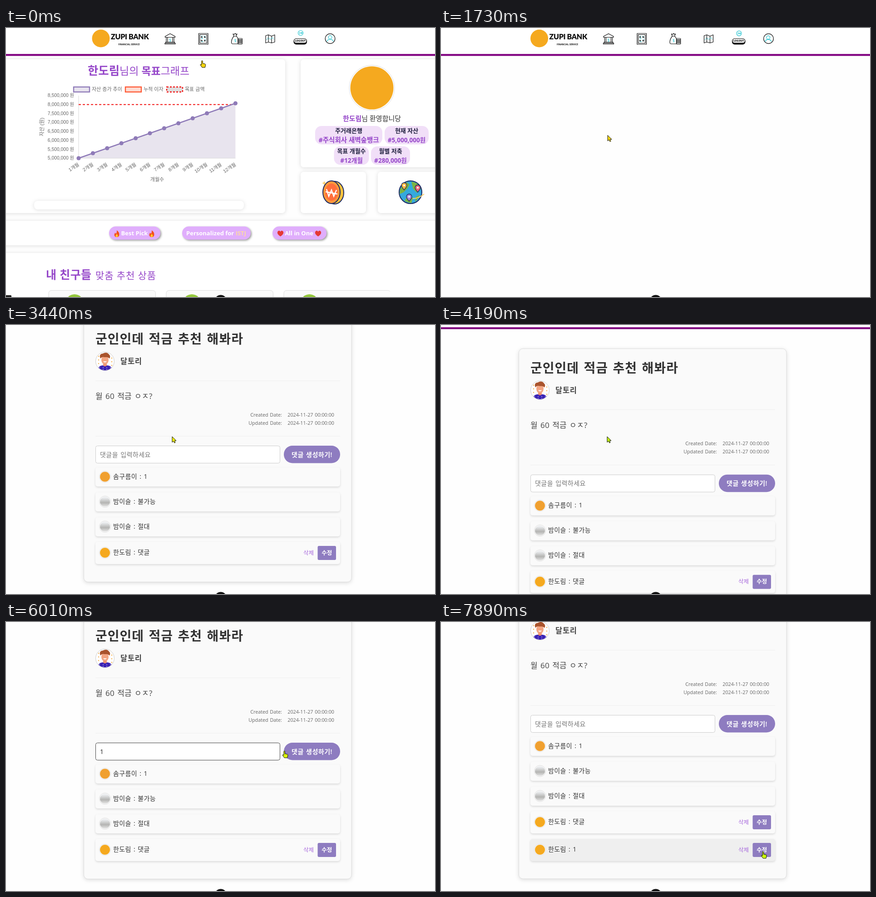
An HTML page for the animation above (8000 ms loop, 945 by 593 pixels).

```html
<!DOCTYPE html>
<html lang="ko">
<head>
<meta charset="utf-8">
<title>Bank community</title>
<style>
  html, body { margin: 0; width: 100%; height: 100%; overflow: hidden; background: #fefefe; }
  svg { display: block; width: 945px; height: 593px; }
  text { font-family: 'Open Sans', 'Noto Sans CJK KR', sans-serif; white-space: pre; }
  #post text { word-spacing: .08em; }
  .chart text { font-family: 'Liberation Sans', 'Noto Sans CJK KR', sans-serif; fill: #666; }
  .panel { fill: #fff; filter: drop-shadow(0 1px 4px #0002); }
  .pill { fill: #e0aefc; filter: drop-shadow(2px 2px 2px #0006); }
  .row { fill: #fafafa; filter: drop-shadow(0 2px 2px #0002); }
  .row.hover { fill: #efefef; }
  .icon { fill: none; stroke: #111; stroke-width: 1.2; stroke-linejoin: round; }
  .teal { stroke: #22c3cf; }
  b, .b { font-weight: 700; }
</style>
</head>
<body>
<svg id="stage" viewBox="0 0 945 593"></svg>
<script>
const PURPLE = '#9546c9', LILAC = '#8e7cc0', LINE = '#8f7bb8', ORANGE = '#f5a91f';
const LOOP = 8000, LIST_AT = 1350, POST_AT = 1950, FOCUS_AT = 5330, TYPE_AT = 5540, SEND_AT = 6450;

const rect = (x, y, w, h, r = 0, attrs = '') =>
  `<rect x="${x}" y="${y}" width="${w}" height="${h}" rx="${r}" ${attrs}/>`;
const circle = (x, y, r, attrs = '') => `<circle cx="${x}" cy="${y}" r="${r}" ${attrs}/>`;
const path = (d, attrs = '') => `<path d="${d}" ${attrs}/>`;
const text = (x, y, size, str, fill = '#333', attrs = '') =>
  `<text x="${x}" y="${y}" font-size="${size}" fill="${fill}" ${attrs}>${str}</text>`;
const group = (attrs, ...parts) => `<g ${attrs}>${parts.join('')}</g>`;
const range = (n, fn) => Array.from({ length: n }, (_, i) => fn(i)).join('');
const MID = 'text-anchor="middle"', END = 'text-anchor="end"', BOLD = 'font-weight="700"';

function header() {
  const bank = path('M350.5 20.5V18.5L361.5 12.5L372.5 18.5V20.5ZM353 21V31M356 21V31M367 21V31M370 21V31M351.5 31H371.5V33H351.5ZM350 33.5H373V35.5H350Z')
    + text(361.5, 30, 9, '$', '#22c3cf', MID + ' stroke="none"');
  const board = rect(424.5, 12, 20.5, 24) + rect(427, 14.5, 15.5, 19)
    + path('M430 18H433M436 18L440 21M430 24L434 22M437 26H440M430 30H435', 'class="teal"')
    + range(4, i => circle(431 + i % 2 * 7, 20 + (i >> 1) * 8, 1.2));
  const money = path('M502 18C496 25 495 35 499 35H511V24Q510 20 507 18ZM502 18L500 13L503 14L505 12L507 14L509 13L507 18Z')
    + range(4, i => rect(511, 23 + i * 3.1, 9.5, 3, 1.4)) + text(505, 31, 9, '$', '#22c3cf', MID + ' stroke="none"');
  const map = path('M-10-7L-4-9L3-6L10-9V7L3 9L-4 7L-10 9ZM-4-9V7M3-6V9')
    + path('M-8 2L-5-2L0 1L5-3L8 1', 'class="teal" stroke-dasharray="2 1.5"');
  return rect(-10, -10, 970, 68, 0, 'fill="#fff"') + rect(-10, 57.3, 970, 4.2, 0, 'fill="#800080"')
    + circle(209, 23, 19.5, `fill="${ORANGE}"`)
    + text(231, 25, 16, 'ZUPI BANK', '#111', 'font-weight="900" style="font-family:Lato,sans-serif;letter-spacing:-.3px"')
    + text(271, 38, 4.9, 'FINANCIAL SERVICE', '#111', MID + BOLD.padStart(19))
    + group('class="icon"', bank, board, money, group('id="map"', map))
    + group('id="exit" class="icon teal"', circle(649, 11, 5.5), path('M647 8.5V13.5M648 11H652.5M650.5 9L652.5 11L650.5 13'))
    + rect(633.5, 23, 29.5, 13.5, 6, 'fill="#111"') + rect(634.5, 23.5, 27.5, 9.5, 4.5, 'fill="#fff" stroke="#111"')
    + text(648.3, 30.3, 5.6, 'LOGOUT', '#111', MID + ' font-weight="800"')
    + group('class="icon"', circle(714, 23.5, 10.8))
    + group('id="user" class="icon teal"', circle(714, 20.5, 3.8), path('M707 30Q708 25 714 25T721 30'))
    + group('id="menu"', rect(406.5, 58, 73, 90.5, 0, 'fill="#fff" stroke="#ccc"'),
        text(443.5, 81, 14.3, '커뮤니티', '#4b1070', MID + ' class="b"'),
        text(443.5, 109, 14, '목표', '#222', MID), text(443.5, 139, 13, 'Q&amp;A', '#222', MID));
}

function chart() {
  const px = i => 160 + i * 31.4, py = i => 287 - i * 11;
  const points = Array.from({ length: 12 }, (_, i) => `${px(i)} ${py(i)}`).join('L');
  const legend = [[149, LINE, '#e8e4ee', '자산 증가 추이', ''], [263, '#ff5a36', '#fddcd3', '누적 이자', ''],
    [354, '#f21818', '#dedede', '목표 금액', 'stroke-dasharray="4 3"']];
  return group('class="chart"',
    legend.map(([x, stroke, fill, label, dash]) =>
      rect(x, 130, 35, 11, 0, `fill="${fill}" stroke="${stroke}" stroke-width="2.4" ${dash}`) + text(x + 40, 138.5, 11, label)).join(''),
    range(8, i => text(150, 152 + i * 19.75, 10.3, `${((8.5 - i / 2) * 1e6).toLocaleString('en')} 원`, '', END)),
    text(0, 0, 11, '자산 (원)', '', MID + ' transform="translate(83 218)rotate(-90)"'),
    range(12, i => text(0, 0, 10.6, `${i + 1}개월`, '', END + ` transform="translate(${px(i) + 2} 303)rotate(-33)"`)),
    text(333, 338, 11, '개월수', '', MID),
    path(`M${points}V287H160Z`, 'fill="#e8e4ee"'), path('M160 149V287H505.5', 'fill="none" stroke="#d8d8d8"'),
    path('M160 168.7H505', 'stroke="#f21818" stroke-width="2" stroke-dasharray="5 4"'),
    path('M' + points, `fill="none" stroke="${LINE}" stroke-width="2.6"`),
    range(12, i => circle(px(i), py(i), 4.6, `fill="${LINE}"`)));
}

function profile() {
  const tag = (x, y, w, label, value, size) => rect(x, y, w, 40.5, 14, 'fill="#f1dff8"')
    + text(x + w / 2, y + 15, 13, label, '#1d1d3c', MID + ' class="b"')
    + text(x + w / 2, y + 36, size, value, PURPLE, MID + ' class="b"');
  return rect(649, 69, 330, 238, 7, 'class="panel"')
    + circle(806, 132, 50, 'fill="#fff" stroke="#ddd"') + circle(806, 132, 47.5, `fill="${ORANGE}"`)
    + text(806, 205, 15, `<tspan class="b" fill="${PURPLE}">한도림</tspan>님 환영합니당`, '#333', MID)
    + tag(681, 216, 148, '주거래은행', '#주식회사 새벽숲뱅크', 14.5) + tag(834, 216, 97, '현재 자산', '#5,000,000원', 13.6)
    + tag(722.5, 261, 77, '목표 개월수', '#12개월', 13.7) + tag(804, 261, 86, '월별 저축', '#280,000원', 13.6);
}

function shortcuts() {
  const pin = (x, y, color) => path(`M${x} ${y + 9}Q${x - 6} ${y + 2} ${x - 6} ${y - 1}a6 6 0 0 1 12 0Q${x + 6} ${y + 2} ${x} ${y + 9}Z`,
    `fill="${color}" stroke="#1b2a63" stroke-width="1.3"`) + circle(x, y - 1, 2, 'fill="#fff"');
  return rect(649, 317, 144, 91, 7, 'class="panel"') + rect(819, 317, 150, 91, 7, 'class="panel"')
    + group('stroke="#1b2a63" stroke-width="2"',
        `<ellipse cx="724" cy="363" rx="20" ry="25" fill="#ffc33d"/><ellipse cx="717" cy="362" rx="19" ry="25" fill="#ff9a3c"/>`,
        `<ellipse cx="717" cy="362" rx="14" ry="19" fill="#ff6f3c" stroke="none"/>`)
    + path('M706 355L711 371L717 357L722 371L728 357M704 361L730 366', 'fill="none" stroke="#fff" stroke-width="2.4"')
    + group('id="spark"', path('M0-9Q1-1 9 0Q1 1 0 9Q-1 1-9 0Q-1-1 0-9Z', 'fill="#ffd86b" stroke="#e8a33a"'))
    + circle(891, 362, 25, 'fill="#35a9dc" stroke="#1b2a63" stroke-width="2"')
    + path('M868 357Q872 345 882 340L889 345L884 354L876 362L867 366ZM893 339Q910 341 914 355L905 363L897 355ZM884 371L896 374L893 386Q883 384 878 381ZM903 372L911 368Q909 377 901 383Z', 'fill="#7cb342"')
    + group('id="orbit"', path('M896 376Q909 376 921 366', 'fill="none" stroke="#ffd06b" stroke-width="2"'))
    + group('id="rays"', path('M863 341L866 344M872 333V336M909 336L907 339M917 341L913 344M862 350H865', 'stroke="#ffb54a" stroke-width="1.8"'))
    + pin(877, 348, '#ffb83d') + pin(907, 353, '#f2697b') + pin(888, 373, '#a78bd6');
}

function home() {
  const flame = x => path(`M${x} 446q6 4 5.5 10q-.5 5-5.5 5t-5.5-5q0-3 2.5-5q0 2 1.5 2.5q2-3 1.500-7.5z`, 'fill="#f4511e"')
    + path(`M${x} 454q3 3 2.500 5t-2.500 2t-2.500-2t2.500-5z`, 'fill="#ffca28"');
  const heart = x => path(`M${x} 459.500q-9-6-6-11q3.500-3.500 6 .5q2.500-4 6-.5q3 5-6 11z`, 'fill="#e53935"');
  const label = (x, str) => text(x, 457, 13, str, '#fff', MID + ' class="b"');
  return rect(-20, 69, 635, 339, 7, 'class="panel"')
    + text(180, 102.5, 23, `<tspan class="b" font-size="25.4">한도림</tspan>님의 <tspan class="b">목표</tspan>그래프`, PURPLE, 'font-weight="300"')
    + chart() + rect(62, 381, 462, 19, 8, 'class="panel"')
    + profile() + shortcuts()
    + rect(-20, 425, 990, 54, 0, 'class="panel"')
    + rect(227, 437.5, 113, 29, 14.5, 'class="pill"') + rect(388, 437.5, 151, 29, 14.5, 'class="pill"') + rect(587, 437.5, 119, 29, 14.5, 'class="pill"')
    + flame(244) + label(283, 'Best Pick') + flame(321)
    + label(463, 'Personalized for <tspan fill="#fbd9a6">ISTJ</tspan>')
    + heart(604.5) + label(645.5, 'All in One') + heart(687.5)
    + rect(-20, 496, 990, 120, 0, 'class="panel"')
    + text(88, 553, 25, '내 친구들', PURPLE, 'class="b" letter-spacing=".4"')
    + text(197, 553, 21, '맞춤 추천 상품', PURPLE, 'font-weight="300" letter-spacing=".9"')
    + '<clipPath id="window"><rect x="86" y="570" width="760" height="30"/></clipPath>'
    + group('clip-path="url(#window)"', group('id="cards"', range(3, i =>
        rect(86.5 + i * 259, 578.5, 235.5, 60, 6, 'fill="#fafafa" stroke="#ddd"') + circle(143.5 + i * 259 - (i ? .5 : 0), 607, 20, 'fill="#95c83d"'))))
    + rect(-4, 589, 16, 10, 2, 'fill="#222"');
}

const rows = [
  { y: 430, h: 42, name: '솜구름이', body: '1', fill: '#f0a030' },
  { y: 485, h: 42, name: '밤이슬', body: '불가능', fill: 'url(#photo)' },
  { y: 540, h: 42, name: '밤이슬', body: '절대', fill: 'url(#photo)' },
  { y: 594, h: 49, name: '한도림', body: '댓글', fill: ORANGE, own: true },
  { y: 655, h: 49, name: '한도림', body: '1', fill: ORANGE, own: true },
];

function comment({ y, h, name, body, fill, own }) {
  const mid = y + h / 2;
  return group('class="comment"', rect(197, y, 539, h, 5, 'class="row"'),
    circle(218, mid - .5, 12.5, 'fill="#fff" stroke="#ddd"'), circle(218, mid - .5, 11, `fill="${fill}"`),
    text(236, mid + 3.500, 14, `${name} : ${body}`, '#333', 'letter-spacing=".4"'),
    own ? text(655, mid + 4, 12.5, '삭제', '#a565dc') + rect(686.5, y + 9, 40.5, 31, 3, `fill="${LILAC}"`)
      + text(706.7, mid + 4, 12.5, '수정', '#fff', MID + ' class="b"') : '');
}

function author() {
  return '<clipPath id="round"><circle cx="218" cy="196" r="20"/></clipPath>'
    + circle(218, 196, 20.5, 'fill="#fff" stroke="#ccc"')
    + group('clip-path="url(#round)"',
        path('M202 220Q202 205 213 205H223Q234 205 234 220Z', 'fill="#3a22b4"'),
        range(8, i => circle(206 + i % 4 * 8, 210 + (i >> 2) * 4, .8, 'fill="#fff"')),
        rect(214, 198, 8, 9, 3, 'fill="#eb9270"'), `<ellipse cx="218" cy="193" rx="8" ry="10" fill="#f3a582"/>`,
        path('M208 190Q204 180 213 179Q222 174 227 181Q231 184 228 190Q224 186 218 187Q211 185 208 190Z', 'fill="#a9532c"'),
        path('M214 196Q218 201 222 196Z', 'fill="#fff"'),
        range(6, i => circle(i % 2 ? 233 : 204, 185 + i * 4, 1.2, 'fill="#f5b04a"')));
}

function post() {
  const divider = y => path(`M197 ${y}H736`, 'stroke="#eee"');
  const date = (y, label) => text(608, y, 10.8, label, '#666', END) + text(723, y, 10.8, '2024-11-27 00:00:00', '#666', END);
  return rect(171.5, 104.5, 589.5, 578, 9, 'id="sheet" fill="#fafafa" stroke="#ddd" style="filter:drop-shadow(0 2px 4px #0002)"')
    + text(197, 157, 28, '군인인데 적금 추천 해봐라', '#333', 'class="b" letter-spacing="1"')
    + author() + text(252, 202, 16.5, '달토리', '#444', 'class="b" letter-spacing=".7"')
    + divider(239) + text(197, 279, 17, '월 60 적금 ㅇㅈ?', '#444', 'letter-spacing=".3"')
    + date(317.5, 'Created Date:') + date(335.5, 'Updated Date:') + divider(361)
    + rect(197.5, 382.5, 406, 38, 4, 'id="field" fill="#fff" stroke="#ccc"')
    + text(207, 406.5, 14, '', '#757575', 'id="draft" letter-spacing=".45"')
    + rect(612, 382, 124, 38.5, 19, `fill="${LILAC}"`)
    + text(674, 406.5, 14, '댓글 생성하기!', '#fff', MID + ' font-weight="600" letter-spacing=".5"')
    + rows.map(comment).join('');
}

const $ = id => document.getElementById(id);
$('stage').innerHTML = '<linearGradient id="photo" x2="0" y2="1"><stop offset=".1" stop-color="#eceef0"/><stop offset=".6" stop-color="#b4b4b2"/><stop offset="1" stop-color="#e6e6e6"/></linearGradient>'
  + group('id="home"', home()) + group('id="post"', post()) + group('id="header"', header())
  + circle(473, 602, 13.5, 'fill="#111"') + path('', 'id="cursor" stroke="#111" stroke-linejoin="round"');
const comments = [...document.querySelectorAll('.comment')];

const CURSORS = {
  arrow: 'M0 0V12.500L3 10L5 14L7 13L5.200 9H9Z',
  hand: 'M-1.300 1.300a1.300 1.300 0 0 1 2.600 0V6L6.500 7.200Q8 7.700 7.700 9.500L6.500 15H0L-4 9.500Q-4 7.500-2.500 8.200L-1.300 9.300Z',
  beam: 'M-3-7H-1L0-6L1-7H3M0-6V6M-3 7H-1L0 6L1 7H3',
};
// Keys are [time, value, ...].
const POINTER = [[70, 432, 72], [330, 435, 32], [480, 436, 34], [870, 449, 76], [1400, 449, 76], [1850, 350, 270], [2550, 345, 278],
  [2950, 366, 246], [4860, 366, 246], [4990, 361, 263], [5130, 347, 272], [5560, 347, 272], [6210, 690, 288], [6700, 690, 288],
  [7000, 703, 316], [7090, 703, 316], [7480, 700, 522], [7820, 709.5, 506]];
const SCROLL = [[3000, 0], [3330, 116], [3979, 116], [4377, 0], [4470, 0], [4820, 116], [7150, 116], [7450, 177]];
const HUE = [[0, 52], [1010, 60], [2550, 43], [4190, 73], [4860, 73], [7080, 61], [7890, 71]];

function at(keys, t) {
  const i = keys.findIndex(k => k[0] > t);
  if (i === 0) return keys[0].slice(1);
  if (i < 0) return keys[keys.length - 1].slice(1);
  const a = keys[i - 1], b = keys[i], p = (t - a[0]) / (b[0] - a[0]), s = p * p * (3 - 2 * p);
  return a.slice(1).map((v, j) => v + (b[j + 1] - v) * s);
}
const show = (el, on) => { el.style.display = on ? '' : 'none'; };
const move = (id, x, y, scale = '1') => $(id).setAttribute('transform', `translate(${x} ${y})scale(${scale})`);
const wave = (t, period) => (1 - Math.cos(t / period * 2 * Math.PI)) / 2;

function frame() {
  const t = performance.now() % LOOP;
  const [x, y] = at(POINTER, t), [scroll] = at(SCROLL, t);
  const atHome = t < LIST_AT, inPost = t >= POST_AT, sent = t >= SEND_AT;

  show($('home'), atHome);
  show($('post'), inPost);
  show($('menu'), t > 280 && t < 1650);
  move('header', atHome || inPost ? 0 : 7.5, -scroll);
  move('post', 0, -scroll);

  move('cards', 7.5 * Math.max(0, 1 - t / 350) ** 2, 0);
  move('map', 582, 24, `${1 - .2 * Math.max(0, 1 - Math.abs(t % 3000 - 1010) / 400)} 1`);
  move('exit', 0, 4 * wave(t, 2040));
  move('user', -3 * wave(t, 2040) * (t < 2040), 2 * wave(t, 2040) * (t < 2040));
  move('spark', 701, 342, .45 + .55 * wave(t, 2040));
  show($('orbit'), t < 500);
  show($('rays'), t >= 500);

  show(comments[4], sent);
  $('sheet').setAttribute('height', sent ? 638.5 : 578);
  const typed = t >= TYPE_AT && !sent;
  $('draft').textContent = typed ? '1' : '댓글을 입력하세요';
  $('draft').setAttribute('fill', typed ? '#222' : '#757575');
  $('field').setAttribute('stroke', t >= FOCUS_AT && !sent ? '#444' : '#ccc');

  const py = y + scroll;
  const inside = (l, top, w, h) => inPost && x > l && x < l + w && py > top && py < top + h;
  rows.forEach((r, i) => comments[i].firstChild.classList.toggle('hover', inside(197, r.y, 539, r.h)));
  const onButton = inside(612, 382, 124, 38) || rows.some((r, i) => r.own && (i < 4 || sent) && inside(655, r.y + 9, 72, 31));
  const kind = atHome || onButton ? 'hand' : inside(197, 382, 406, 38) ? 'beam' : 'arrow';
  $('cursor').setAttribute('d', CURSORS[kind]);
  $('cursor').setAttribute('fill', kind === 'beam' ? 'none' : `hsl(${at(HUE, t)[0]} 92% 50%)`);
  move('cursor', x, y);
  requestAnimationFrame(frame);
}
frame();
</script>
</body>
</html>
```
